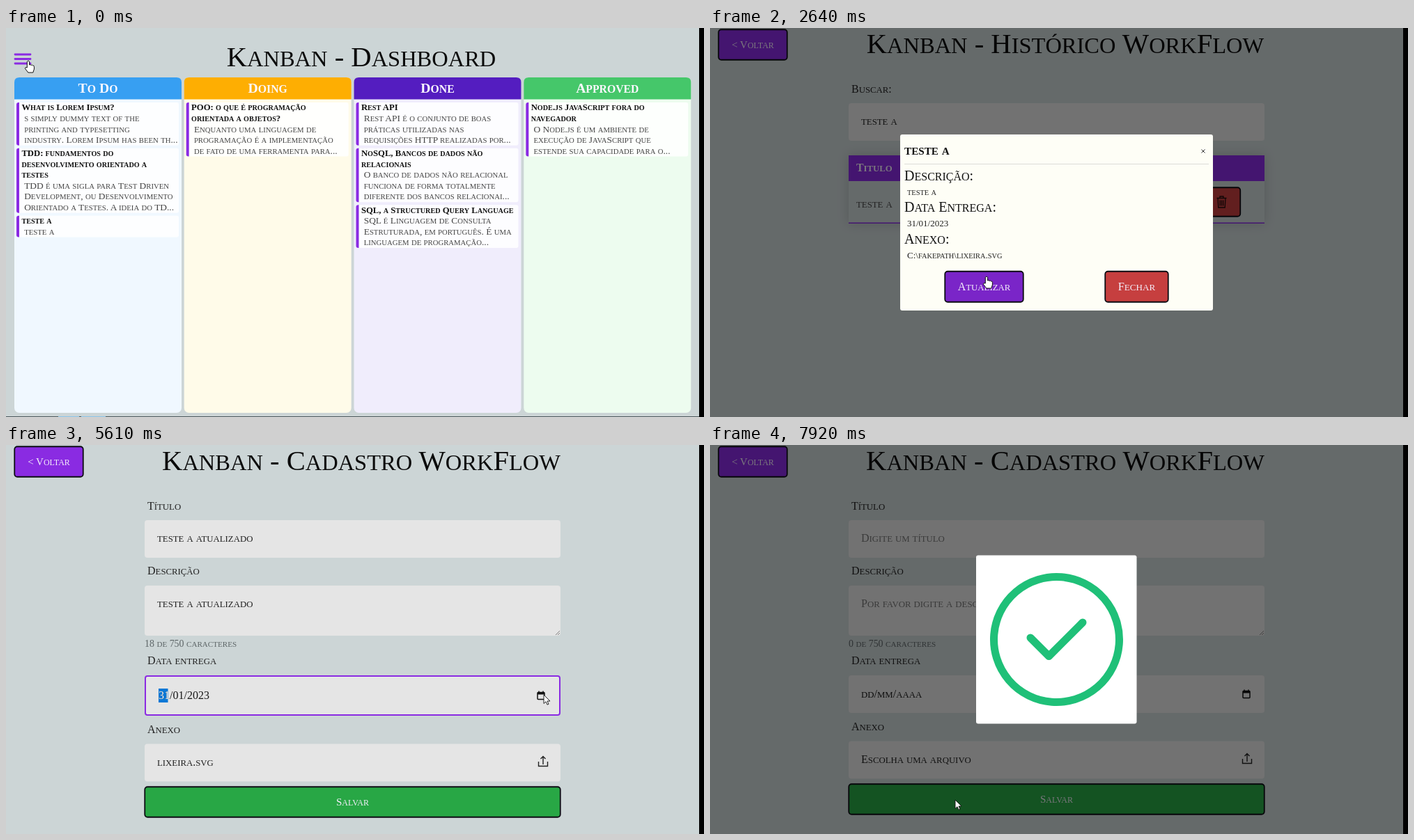
Write an HTML page that moves like this. It is 1002 px wide and 559 px high and loops after 8.25 s.

```html
<!DOCTYPE html>
<html lang="pt">
<head>
<meta charset="utf-8">
<title>Kanban</title>
<style>
  html, body { margin: 0; width: 100%; height: 100%; overflow: hidden; background: #ccd5d6; }
  svg { display: block; width: 1002px; height: 559px; font-family: "Liberation Serif", serif; }
  .shadow { filter: drop-shadow(0 0 8px rgba(0, 0, 0, .16)); }
  .bar { font-family: "Liberation Sans", sans-serif; }
  .status { font-family: Roboto, sans-serif; }
</style>
</head>
<body>
<svg id="stage" viewBox="0 0 1002 559"></svg>
<script>
const STEP = 330, LOOP = 8250;
const BG = '#ccd5d6', PURPLE = '#8a2be2', RED = '#c63f3f', GREEN = '#28a745', FIELD = '#e5e5e5';

const attrs = o => Object.entries(o).map(([k, v]) => `${k}="${v}"`).join(' ');
const box = (x, y, w, h, fill, more = {}) =>
  `<rect ${attrs({ x, y, width: w, height: h, fill, ...more })}/>`;
const line = (d, stroke, width, more = {}) =>
  `<path ${attrs({ d, stroke, 'stroke-width': width, fill: 'none', ...more })}/>`;

// Small capitals: lower case runs become capitals at 80 % size.
function text(str, x, mid, size = 16, fill = '#222', more = {}, tail = '') {
  const caps = str.replace('<', '&#60;').replace(/\p{Ll}+/gu,
    m => `<tspan font-size="${size * .8}">${m.toUpperCase()}</tspan>`);
  return `<text ${attrs({ x, y: mid + size * .31, 'font-size': size, fill, ...more })}>${caps}${tail}</text>`;
}
const centered = { 'text-anchor': 'middle' };
const bold = { 'font-weight': 'bold' };
const title = (str, y = 23) => text(str, 510, y, 40.6, '#0a0a0a', centered);

function button(x, y, w, h, fill, label = '', size = 16) {
  return box(x + .75, y + .75, w - 1.5, h - 1.5, fill, { rx: 4, stroke: '#0b0b12', 'stroke-width': 1.8 }) +
    text(label, x + w / 2, y + h / 2, size, '#f4eefa', centered);
}

const cursors = {
  arrow: `<path d="M0 0V12.5L3 9.8L5 14.2L7 13.3L5 9H9Z" fill="#fff" stroke="#111" stroke-width=".9"/>`,
  hand: `<path d="M-1.7 10V1.2Q0-1.2 1.6 1.2V6Q3 5 4.2 6.4Q5.7 5.6 6.6 7Q8.2 6.6 8.4 8.4V12L6.8 17H-.2L-4.6 11.2Q-4.6 8.6-1.7 10Z" fill="#fff" stroke="#111"/>`,
  beam: `<path d="M-2.5-6H-.6L0-5.4L.6-6H2.5M0-5.4V5.4M-2.5 6H-.6L0 5.4L.6 6H2.5" fill="none" stroke="#222"/>`
};
const pointer = [
  [0, 'hand', 32, 47], [1, 'hand', 45, 130], [2, 'arrow', 45, 130], [3, 'beam', 300, 135],
  [6, 'hand', 643, 250], [7, 'arrow', 643, 250], [8, 'hand', 397, 357], [9, 'arrow', 397, 357],
  [10, 'arrow', 360, 250], [11, 'beam', 323, 135], [14, 'beam', 323, 232], [17, 'arrow', 772, 359],
  [18, 'arrow', 600, 440], [19, 'hand', 352, 510], [20, 'arrow', 352, 510]
];
function cursor(step) {
  const [, kind, x, y] = pointer.filter(p => p[0] <= step).pop();
  return `<g transform="translate(${x} ${y})">${cursors[kind]}</g>`;
}

const status = () => box(0, 543, 224, 16, '#202427', { rx: 2 }) +
  `<text class="status" x="4" y="555" font-size="9.2" fill="#e8eaea">https://kanban-brunovilarmontelo.vercel.app/historico</text>`;
const dim = () => box(0, 0, 995, 559, '#000', { opacity: .5 });
const back = () => button(11.5, 1.5, 100, 45, PURPLE, '< Voltar', 15);

// Dashboard
const columns = [
  ['To Do', 12, '#379ff2', '#f0f8ff', [
    ['What is Lorem Ipsum?', 's simply dummy text of the|printing and typesetting|industry. Lorem Ipsum has been th...'],
    ['TDD: fundamentos do|desenvolvimento orientado a|testes', 'TDD é uma sigla para Test Driven|Development, ou Desenvolvimento|Orientado a Testes. A ideia do TD...'],
    ['teste a', 'teste a']]],
  ['Doing', 255.7, '#feae02', '#fffbe9', [
    ['POO: o que é programação|orientada a objetos?', 'Enquanto uma linguagem de|programação é a implementação|de fato de uma ferramenta para...']]],
  ['Done', 499.5, '#541dc0', '#f0edfc', [
    ['Rest API', 'Rest API é o conjunto de boas|práticas utilizadas nas|requisições HTTP realizadas por...'],
    ['NoSQL, Bancos de dados não|relacionais', 'O banco de dados não relacional|funciona de forma totalmente|diferente dos bancos relacionai...'],
    ['SQL, a Structured Query Language', 'SQL é Linguagem de Consulta|Estruturada, em português. É uma|linguagem de programação...']]],
  ['Approved', 743.3, '#45c76a', '#edfcef', [
    ['Node.js JavaScript fora do|navegador', 'O Node.js é um ambiente de|execução de JavaScript que|estende sua capacidade para o...']]]
];
function card(x, y, heads, lines) {
  const h = (heads.length + lines.length) * 15.6 - .6;
  let out = box(x + 3, y, 233, h, '#fff', { rx: 3, opacity: .9 }) +
    line(`M${x + 7} ${y}h-1q-3 0-3 3v${h - 6}q0 3 3 3h1Z`, 'none', 0, { fill: PURPLE });
  heads.forEach((s, i) => out += text(s, x + 10.4, y + 7.4 + i * 15.6, 12.7, '#111', bold));
  lines.forEach((s, i) => out += text(s, x + 14.2, y + 7.4 + (heads.length + i) * 15.5, 13.4, '#444'));
  return [out, y + h + 4];
}
function dashboard() {
  let out = title('Kanban - Dashboard', 42);
  for (const y of [38, 44.5, 51]) out += line(`M13 ${y}H35`, PURPLE, 2.8, { 'stroke-linecap': 'round' });
  for (const [name, x, head, body, cards] of columns) {
    out += box(x, 71, 240, 482, body, { rx: 7 }) +
      line(`M${x} 102.5V78q0-7 7-7h226q7 0 7 7V102.5Z`, 'none', 0, { fill: head }) +
      text(name, x + 120, 87, 19.7, '#fbf8ff', { ...centered, ...bold });
    let y = 107, part;
    for (const [a, b] of cards) {
      [part, y] = card(x, y, a.split('|'), b.split('|'));
      out += part;
    }
  }
  return out + box(0, 558, 995, 1, '#4c585c') + box(75, 558, 30, 1, '#8cc4e8') + box(108, 558, 35, 1, '#8cc4e8');
}

// Form pieces
const caret = '<tspan class="bar" font-size="20" dx="-1.5">|</tspan>';
function field(y, h, str, { focus = false, hint = false, mid = 26.5, mark = true } = {}) {
  const k = focus ? 2 : 0;
  return box(199, y, 597, h + 2 * k, FIELD, { rx: 4 }) +
    (focus ? box(200, y + 1, 595, h + 2, 'none', { rx: 3, stroke: PURPLE, 'stroke-width': 2 }) : '') +
    text(str, 217 + k, y + mid + k, 16, hint ? '#757575' : '#222', {}, focus && mark ? caret : '');
}
const label = (str, y) => text(str, 203, y);

// History
const tasks = [
  ['What is Lorem|Ipsum?', 'To Do'],
  ['TDD: fundamentos|do|desenvolvimento|orientado a testes', 'To Do'],
  ['POO: o que é|programação|orientada a|objetos?', 'Doing'],
  ['teste a', 'To Do']
];
function taskRow([name, phase], i, y, right, shift) {
  const lines = name.split('|'), h = Math.max(61, 33 + 19.2 * lines.length), mid = y + 33;
  const lx = 617.5 - shift, dx = 713.5 - shift;
  let out = box(199, y, right - 199, h, i % 2 ? '#f2f2f2' : BG);
  lines.forEach((s, n) => out += text(s, 210, mid + n * 19, 16, '#444'));
  out += text('26/01/2023', 382, mid, 15.7, '#444') + text(phase, 494, mid, 16, '#444') +
    button(lx, y + 8.5, 54.5, 43, PURPLE) + button(dx, y + 8.5, 54.5, 43, RED);
  for (const n of [-6, 0, 6]) out += line(`M${lx + 19.5} ${y + 30 + n}h2M${lx + 24} ${y + 30 + n}h11`, '#20103a', 1.3);
  out += `<g transform="translate(${dx + 27} ${y + 30})">` +
    line('M-7-5.5H7M-2.5-5.5V-8H2.5V-5.5M-5.5-5.5L-4.7 8H4.7L5.5-5.5M-2.3-2.5V5.5M0-2.5V5.5M2.3-2.5V5.5', '#200c0c', 1.3) + '</g>';
  return [out, y + h];
}
function history(query, focus) {
  const rows = tasks.filter(t => t[0].replaceAll('|', ' ').toLowerCase().includes(query));
  const full = !query, right = full ? 789 : 796, top = focus ? 187 : 183;
  let body = '', y = top + 37, part;
  rows.forEach((task, i) => {
    [part, y] = taskRow(task, i, y, right, full ? 0 : 6);
    body += part;
  });
  const bottom = full ? top + 349 : y;
  return back() + title('Kanban - Histórico WorkFlow') + label('Buscar:', 88) +
    field(108, 54, query || (focus ? '' : 'Será pesquisado por Título'), { focus, hint: !query }) +
    box(199, top, 597, bottom - top, BG, { class: 'shadow' }) +
    `<clipPath id="view">${box(199, top, 597, bottom - top, '#000')}</clipPath><g clip-path="url(#view)">${body}</g>` +
    box(199, top, right - 199, 37, PURPLE) +
    [['Titulo', 210], ['Data', 382], ['Fase', 494]].map(([s, x]) => text(s, x, top + 18.5, 15.9, '#f6f0fc', bold)).join('') +
    (full ? box(789, top, 7, 349, '#f1f1f1') + box(789, top, 7, 178, '#a970e2', { rx: 3 })
          : box(199, bottom - 1.5, 597, 1.5, PURPLE));
}
function details(hover) {
  const rows = [['Descrição:', 'teste a', 213], ['Data Entrega:', '31/01/2023', 258], ['Anexo:', 'C:\\fakepath\\lixeira.svg', 304]];
  return box(273, 153, 449, 253, '#fefef6', { rx: 3 }) +
    text('teste a', 279, 176, 19, '#111', bold) +
    line('M705.5 174.5l5 5m0-5l-5 5', '#333', 1) + line('M279 195.5H716', '#dcdcd8', 1) +
    rows.map(([a, b, y]) => text(a, 279, y, 20, '#111') + text(b, 283, y + 22.5, 13)).join('') +
    button(336.5, 349, 114, 45.5, hover ? '#7a25c8' : PURPLE, 'Atualizar') +
    button(566.5, 349, 92, 45.5, RED, 'Fechar', 16.4);
}

// Edit form
function form({ name, desc, date, file, focus }) {
  const empty = !name;
  const s1 = focus === 'name' ? 4 : 0;
  const s2 = s1 + (focus === 'desc' ? 4 : 0);
  const onDate = focus === 'date', s3 = s2 + (onDate ? 4 : 0);
  const end = 202 + s1 + 72 + (s2 - s1);
  const cx = onDate ? 768 : 770, cy = 358 + s2 + (onDate ? 2 : 0);
  return back() + title('Kanban - Cadastro WorkFlow') +
    label('Título', 88) + field(108, 54, name || 'Digite um título', { focus: focus === 'name', hint: empty }) +
    label('Descrição', 181 + s1) +
    field(202 + s1, 72, desc || 'Por favor digite a descrição', { focus: focus === 'desc', hint: empty }) +
    line(`M789 ${end - 1}l6-6m-3 6l3-3`, '#666', .8) +
    text(`${desc.length} de 750 caracteres`, 199, 286 + s2, 13.9, '#5c6466') +
    label('Data entrega', 310 + s2) +
    field(331 + s2, 54, '', { focus: onDate, mark: false }) +
    (onDate ? box(219, 350 + s2, 13.5, 20, '#0b78d6') : '') +
    text(date, onDate ? 219 : 217, cy, 16, '#1a1a1a') +
    (onDate ? text('31', 219, cy, 16, '#fff') : '') +
    box(cx - 5, cy - 4.5, 10, 10, 'none', { stroke: '#111', 'stroke-width': 1.5, rx: 1 }) +
    box(cx - 5, cy - 5, 10, 3.5, '#111') + line(`M${cx - 3} ${cy - 6.5}v2m6-2v2`, '#111', 1.4) +
    label('Anexo', 405 + s3) + field(425.5 + s3, 54, file) +
    line(`M771 ${455 + s3}v-11.5m-3.5 3.5l3.5-3.5l3.5 3.5M764.5 ${451 + s3}v6.5h13v-6.5`, '#222', 1.4) +
    button(198.5, 486.5 + s3, 598, 45, GREEN, 'Salvar', 15);
}

// Success mark: the ring is drawn first, then the tick.
function success(ring, tick) {
  const pen = share => ({ pathLength: 1, 'stroke-dasharray': `${share} 2`, 'stroke-linecap': 'round', 'stroke-linejoin': 'round' });
  return box(382, 158.5, 230.5, 242, '#fff', { rx: 3 }) +
    `<g transform="rotate(4.5 497.5 279.5)">` +
    line('M497.5 189.5a90 90 0 0 1 0 180a90 90 0 0 1 0-180', '#1fc078', 11, pen(ring)) + '</g>' +
    (tick ? line('M460 277L486.5 303.5L535 255', '#1fc078', 11, pen(tick)) : '');
}

function scene(step) {
  if (step < 2) return dashboard() + (step ? status() : '');
  if (step < 7) return history(['', '', 'te', 'teste', 'teste a'][step - 2], step > 2) + (step === 2 ? status() : '');
  if (step < 9) return history('teste a', false) + dim() + details(step === 8);
  if (step < 20) {
    const old = 'teste a', fresh = 'teste a atualizado';
    return form({
      name: step < 13 ? old : step < 14 ? 'teste a atualiz' : fresh,
      desc: step < 15 ? old : fresh,
      date: '31/01/2023', file: 'lixeira.svg',
      focus: step < 12 ? '' : step < 14 ? 'name' : step < 17 ? 'desc' : 'date'
    });
  }
  const ring = [.011, .45, .93, 1, 1][step - 20], tick = [0, 0, 0, .5, 1][step - 20];
  return form({ name: '', desc: '', date: 'dd/mm/aaaa', file: 'Escolha uma arquivo' }) + dim() + success(ring, tick);
}

const stage = document.getElementById('stage');
let shown = -1;
function tick() {
  const step = Math.floor(performance.now() % LOOP / STEP);
  if (step !== shown) {
    shown = step;
    stage.innerHTML = box(0, 0, 1002, 559, BG) + scene(step) + box(995, 0, 7, 559, '#000') + cursor(step);
  }
  requestAnimationFrame(tick);
}
tick();
</script>
</body>
</html>
```
